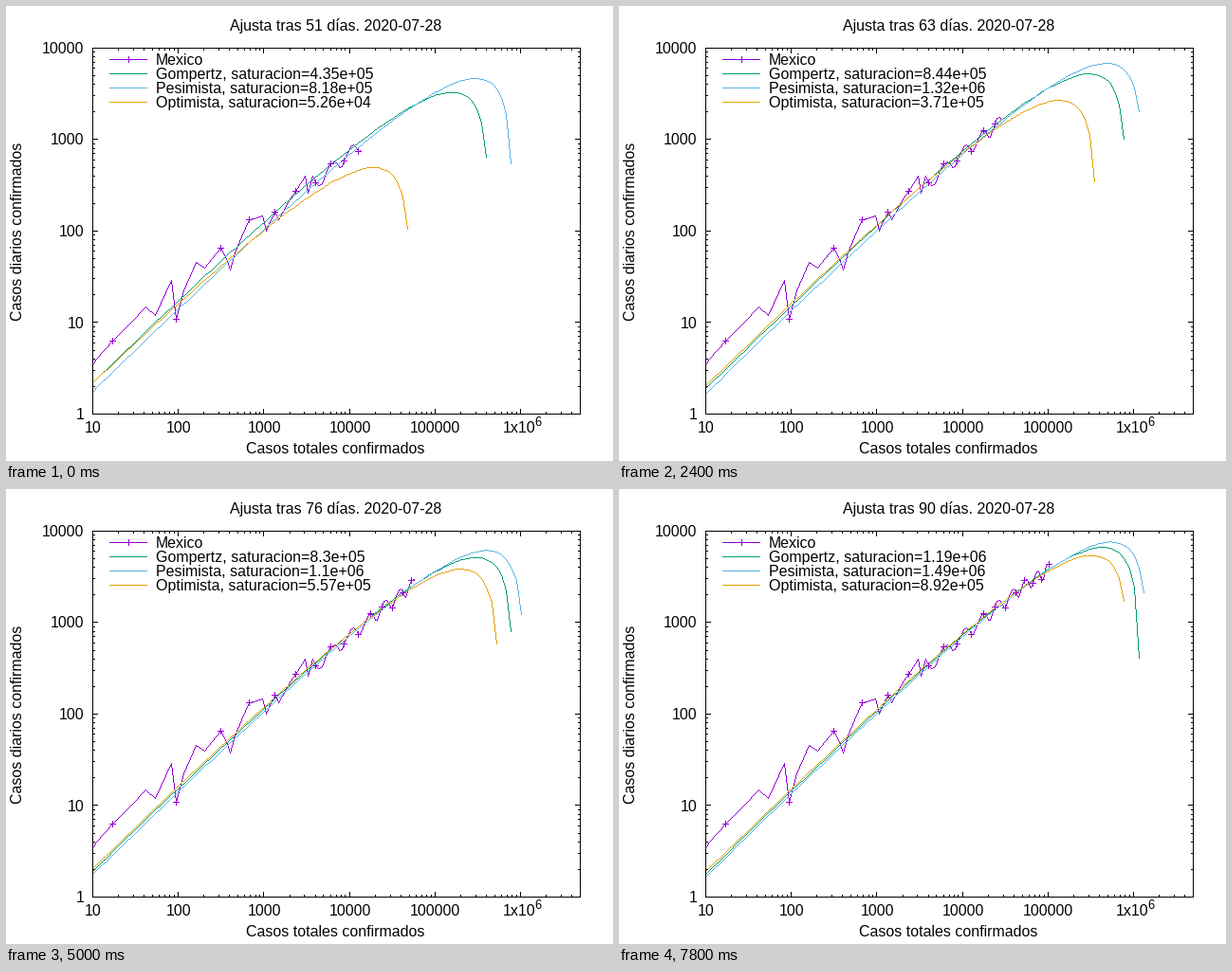
These frames come from a looping animation (640x480 px, 8000 ms). A matplotlib script:

```python
import numpy as np
import matplotlib
import matplotlib.pyplot as plt
from matplotlib.animation import FuncAnimation

matplotlib.rcParams.update({"font.family": "Liberation Sans",
                            "font.size": 11.52,
                            "text.hinting": "default"})

FIRST_DAY, LAST_DAY, STEP = 51, 90, 200
LEFT, RIGHT, TOP, BOTTOM = 91, 605, 45, 431
PX = (RIGHT - LEFT) / np.log10(5e5)
PY = (BOTTOM - TOP) / 4
PURPLE, GREEN, BLUE, ORANGE = "#9400d3", "#009e73", "#56b4e9", "#e69f00"
SAMPLES = np.geomspace(10, 5e6, 100)

# turning points of the early outbreak: day -> new cases
TURNS = {3: 2, 4: 4, 7: 15, 8: 12, 9: 29, 10: 11, 12: 46, 13: 39, 15: 65,
         17: 38, 20: 132, 22: 145, 23: 101, 25: 163, 26: 132, 32: 396,
         33: 260, 34: 403}

# day -> saturation of the fit and its error, in thousands
FITS = {51: (435.3, 382.7), 55: (1400, 1700), 59: (277, 105), 63: (844, 473),
        67: (311.3, 85.6), 72: (491, 139), 76: (830, 273), 83: (1054, 290),
        90: (1190.5, 298.5)}


def log_interp(x, xs, ys):
    return np.exp(np.interp(x, xs, np.log(ys)))


def rate(x, a, k):
    """Gompertz growth a x ln(k / x), undefined beyond saturation."""
    ratio = k / x
    ok = ratio > 1
    return np.where(ok, a * x * np.log(np.where(ok, ratio, 1)), np.nan)


def outbreak():
    """Early turning points, then Gompertz growth with a weekly wave."""
    total, new = [5.0], [0.0]
    for day in range(1, LAST_DAY + 1):
        if day < min(TURNS):
            cases = 0
        elif day <= max(TURNS):
            cases = log_interp(day, list(TURNS), list(TURNS.values()))
        else:
            week = 1 + 0.17 * np.cos(2 * np.pi * (day - 5.3) / 7)
            cases = week * float(rate(total[-1], 0.0156, 1.19e6))
        new.append(cases)
        total.append(total[-1] + cases)
    return np.array(total), np.array(new)


def fit(day):
    """Rate, saturation and their errors; a high saturation goes with a low rate."""
    k, dk = (1e3 * log_interp(day, list(FITS), col)
             for col in zip(*FITS.values()))
    a = 0.02344 * (k / 2.77e5) ** -0.296
    return a, k, a * (0.025 + 0.25 * dk / k), dk


def to_px(x, y):
    """Log-log data to whole pixels; undefined values become NaN."""
    x, y = np.asarray(x, float), np.asarray(y, float)
    y = np.where(y > 0, y, np.nan)
    return (np.floor(LEFT + PX * (np.log10(x) - 1) + 0.5),
            np.ceil(BOTTOM - PY * np.log10(y) - 0.5))


def trace(x, y):
    """Pixels on a one-pixel polyline inside the plot box; NaN breaks it."""
    parts = []
    for x0, y0, x1, y1 in zip(x[:-1], y[:-1], x[1:], y[1:]):
        n = max(abs(x1 - x0), abs(y1 - y0))
        if np.isfinite(n):
            t = np.linspace(0, 1, int(n) + 1)
            parts.append([x0 + (x1 - x0) * t, y0 + (y1 - y0) * t])
    if not parts:
        return [], []
    px, py = np.floor(np.concatenate(parts, axis=1) + 0.5)
    inside = px >= LEFT
    return px[inside], py[inside]


def pluses(x, y, r=3):
    """A broken line that draws a plus sign at every point."""
    dx = np.array([-r, r, np.nan, 0, 0, np.nan])
    dy = np.array([0, 0, np.nan, -r, r, np.nan])
    return ((np.atleast_1d(x)[:, None] + dx).ravel(),
            (np.atleast_1d(y)[:, None] + dy).ravel())


fig = plt.figure(figsize=(6.4, 4.8), dpi=100, facecolor="white")
ax = fig.add_axes([0, 0, 1, 1])
ax.set(xlim=(0, 640), ylim=(480, 0))
ax.axis("off")


def stroke(x, y, color, z=2):
    line, = ax.plot(*trace(x, y), ",", color=color, antialiased=False,
                    zorder=z)
    return line


def label(x, y, text, ha="center", **kw):
    return ax.text(x, y, text, ha=ha, va="baseline", color="black", **kw)


def ticks():
    for e in range(6):
        for n in range(1, 10):
            size = 5 if n == 1 else 2
            x, y = to_px(n * 10 ** (e + 1), n * 10 ** e)
            if x <= RIGHT:
                stroke([x, x], [BOTTOM, BOTTOM - size], "black", 4)
                stroke([x, x], [TOP, TOP + size], "black", 4)
            if y >= TOP:
                stroke([LEFT, LEFT + size], [y, y], "black", 4)
                stroke([RIGHT, RIGHT - size], [y, y], "black", 4)


ticks()
stroke([LEFT, RIGHT, RIGHT, LEFT, LEFT],
       [TOP, TOP, BOTTOM, BOTTOM, TOP], "black", 5)

for e in range(5):
    label(82.5, BOTTOM - PY * e + 5, str(10 ** e), "right")
    label(LEFT + 1 + PX * e, 450, str(10 ** (e + 1)))
label(524, 450, "1x10", "left")
label(557, 443, "6", "left", fontsize=9.2)
label(347, 472, "Casos totales confirmados")
label(17.5, 238, "Casos diarios confirmados", rotation=90,
      rotation_mode="anchor")
title = label(348, 26, "")

keys, curves = [], []
for i, color in enumerate([PURPLE, GREEN, BLUE, ORANGE]):
    row = 57 + 15 * i
    stroke([109, 148], [row, row], color)
    keys.append(label(158, row + 4.5, "Mexico", "left"))
    curves.append(stroke([], [], color))
stroke(*pluses(129, 57), PURPLE)
marks = stroke([], [], PURPLE)

TOTAL, NEW = outbreak()


def update(i):
    day = FIRST_DAY + i
    title.set_text(f"Ajusta tras {day} días. 2020-07-28")
    x, y = to_px(TOTAL[:day + 1], NEW[:day + 1])
    curves[0].set_data(*trace(x, y))
    marks.set_data(*trace(*pluses(x[::5], y[::5])))
    a, k, da, dk = fit(day)
    for j, (name, s) in enumerate(
            [("Gompertz", 0), ("Pesimista", 1), ("Optimista", -1)], 1):
        sat = k + s * dk
        keys[j].set_text(f"{name}, saturacion={sat:.3g}")
        curves[j].set_data(*trace(*to_px(SAMPLES,
                                         rate(SAMPLES, a - s * da, sat))))
    return [title, marks, *keys, *curves]


anim = FuncAnimation(fig, update, frames=LAST_DAY - FIRST_DAY + 1,
                     interval=STEP, repeat=True, repeat_delay=0, blit=False)
plt.show()
```
